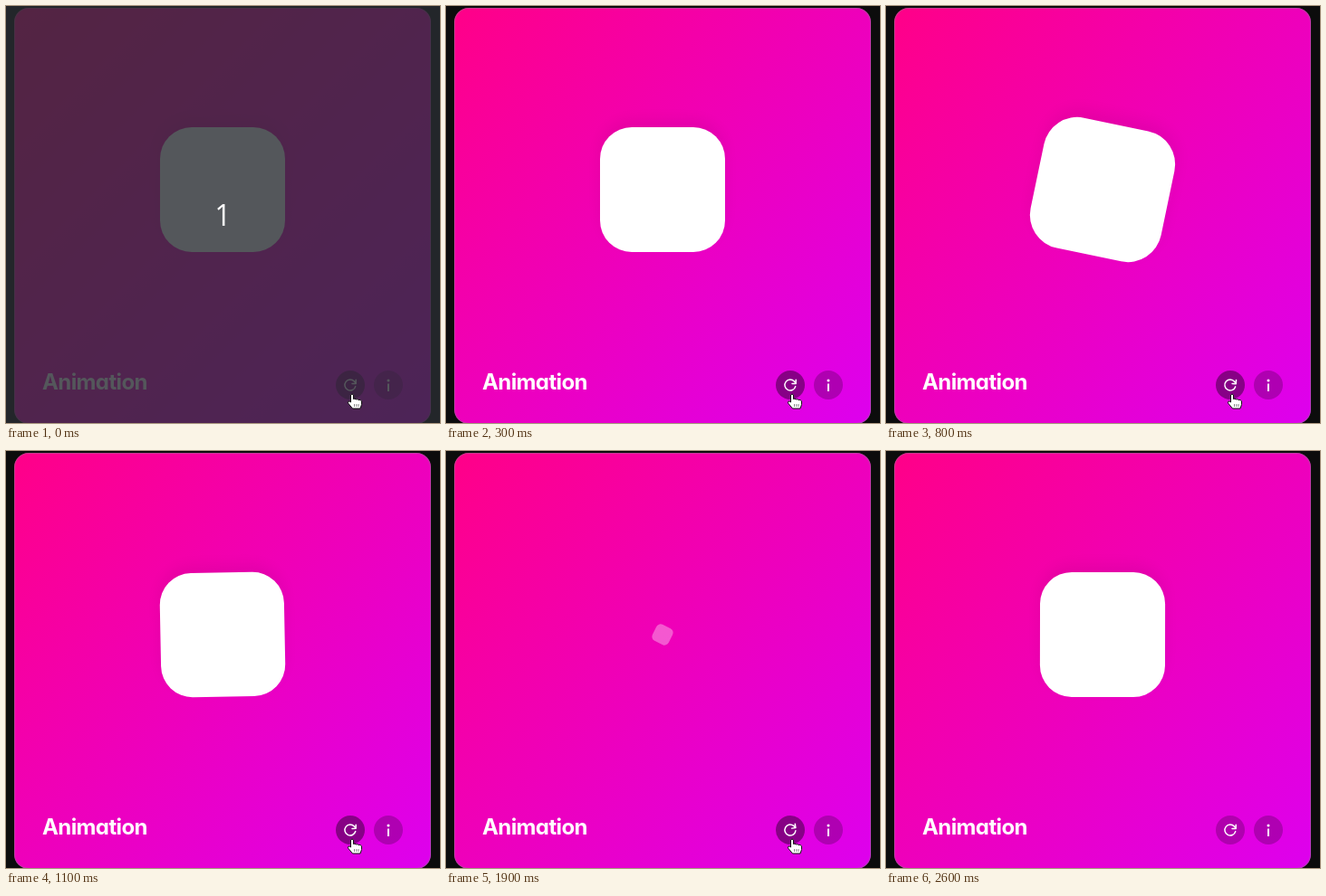
An HTML page that plays this animation: 479x461 px, repeating every 2700 ms.

```html
<!DOCTYPE html>
<html lang="en">
<head>
<meta charset="utf-8">
<title>Animation</title>
<style>
  html, body { margin: 0; width: 100%; height: 100%; overflow: hidden; background: #0c0c0c; }
  .stage { position: relative; width: 479px; height: 461px; overflow: hidden; }
  .stage > * { position: absolute; }
  .card {
    left: 9px; top: 2px; width: 460px; height: 460px; border-radius: 16px;
    background: linear-gradient(135deg, #f08, #d0e);
    box-shadow: inset 0 0 0 1px rgba(140, 120, 140, .5);
  }
  .box {
    left: 170px; top: 134px; width: 138px; height: 138px; border-radius: 35px;
    background: #fff; box-shadow: 0 8px 16px rgba(0, 0, 0, .06);
  }
  .title {
    left: 40px; top: 401px; color: #fff; white-space: nowrap;
    font: 700 24px/30px Inter, sans-serif; letter-spacing: -.6px;
    font-feature-settings: "cv11";
  }
  .button {
    top: 403px; width: 32px; height: 32px; border-radius: 50%;
    background: rgba(0, 0, 0, .22);
  }
  .button svg { display: block; fill: none; stroke: #fff; stroke-width: 1.5; }
  .replay { left: 364px; }
  .replay.hover { background: rgba(0, 0, 0, .4); }
  .info { left: 406px; }
  .shade { inset: 0; background: rgba(42, 46, 50, .8); }
  .count {
    inset: 0; text-align: center; color: #fff;
    font: 32px/461px "Open Sans", sans-serif;
  }
  .cursor { left: 0; top: 0; overflow: visible; }
</style>
</head>
<body>
<div class="stage">
  <div class="card"></div>
  <div class="box" id="box"></div>
  <div class="title">Animation</div>
  <div class="button replay" id="replay">
    <svg id="icon" width="32" height="32" stroke-linecap="round" stroke-linejoin="round">
      <path d="M21.7 17.6A6 6 0 1 1 20.4 12L22 13.8M22.2 10.2V14.4H18"/>
    </svg>
  </div>
  <div class="button info">
    <svg width="32" height="32">
      <path d="M16 14.5V23" stroke-width="2"/>
      <circle cx="16" cy="11" r="1.5" fill="#fff" stroke="none"/>
    </svg>
  </div>
  <div class="shade" id="shade"></div>
  <div class="count" id="count">1</div>
  <svg class="cursor" id="cursor" width="16" height="18">
    <path fill="#fff" stroke="#111" stroke-width="1" stroke-linejoin="round"
      d="M-1.5 1Q0-1 1.5 1V5.5Q3 4.5 4.3 6Q6 5 7.2 6.6Q9 5.8 10.5 7.8V11.5L9 16H0.5L-4.6 9.8Q-4.6 7.6-2.8 8L-1.5 9Z"/>
    <path fill="none" stroke="#555" stroke-width=".7" d="M2.5 11V14M4.8 11V14M7 11V14"/>
  </svg>
</div>
<script>
  const LOOP = 2700, STEP = 100, RATE = 1.06;
  const CLICKS = [{ at: 600, tilt: -45 }, { at: 1864, tilt: -10 }];
  const [box, replay, icon, shade, count, cursor] =
    ["box", "replay", "icon", "shade", "count", "cursor"].map(id => document.getElementById(id));

  // Underdamped spring from 0 to 1: stiffness 260, damping 20, mass 1.
  function spring(s) {
    const w = Math.sqrt(160);
    return 1 - Math.exp(-10 * s) * (Math.cos(w * s) + 10 / w * Math.sin(w * s));
  }

  function render(t) {
    const click = CLICKS.filter(c => t >= c.at).pop();
    const age = click ? (t - click.at) / 1000 * RATE : 9;
    const x = spring(age);
    box.style.transform = `rotate(${180 * x}deg) scale(${x})`;
    box.style.opacity = Math.min(1, age / .11);

    const pressed = !click && t >= 500;
    const tilt = click ? click.tilt * (1 - x) : pressed ? -20 : 0;
    icon.style.transform = `rotate(${tilt}deg)`;

    const leave = Math.max(0, (t - 2000) / 100);
    replay.classList.toggle("hover", leave <= 0);
    cursor.style.transform = `translate(${382 + 40 * leave}px, ${429 - 426 * leave}px)`;
    cursor.style.display = leave > 1 ? "none" : "";

    shade.hidden = count.hidden = t >= 100;
  }

  let start;
  function tick(now) {
    start ??= now;
    const t = (now - start) % LOOP;
    render(Math.floor(t / STEP) * STEP);
    requestAnimationFrame(tick);
  }
  render(0);
  requestAnimationFrame(tick);
</script>
</body>
</html>
```
